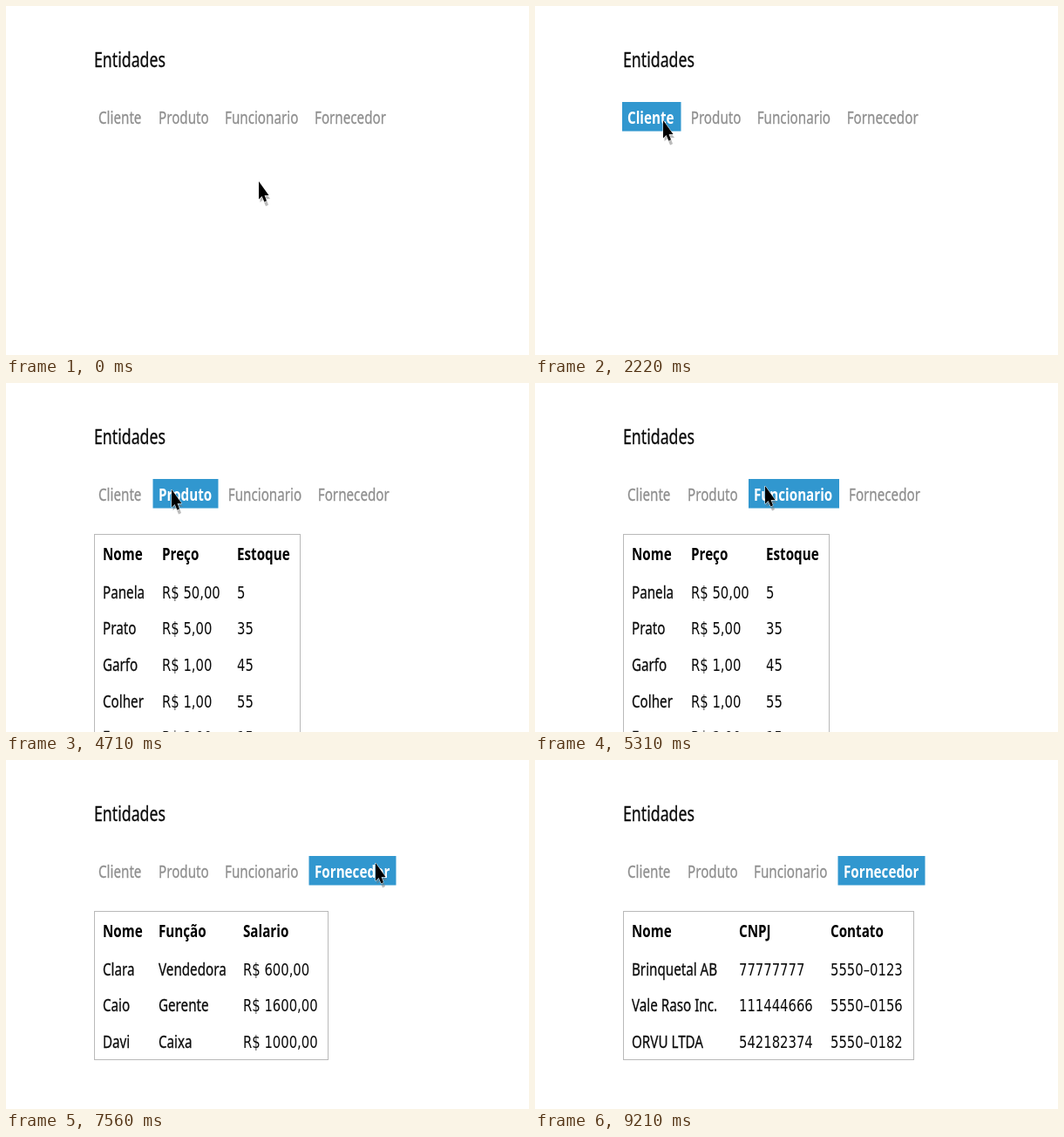
An HTML page that plays this animation: 600 by 400 pixels, repeating every 9270 ms.

```html
<!DOCTYPE html>
<html lang="pt">
<head>
<meta charset="utf-8">
<title>Entidades</title>
<style>
  html, body { margin: 0; width: 100%; height: 100%; overflow: hidden; background: #fff; }
  svg { display: block; }
  text { font: 20px "Noto Sans", sans-serif; fill: #0c0c0c; stroke: #0c0c0c; stroke-width: .3; white-space: pre; }
  .title { font-size: 23.3px; }
  .tab { fill: #8e8e8e; stroke: #8e8e8e; }
  .active { fill: #fff; stroke: none; font-weight: 700; }
  .head { fill: #000; stroke: none; font-weight: 700; }
  .number { font: 19.5px "DejaVu Sans", sans-serif; stroke: none; }
  .frame { fill: none; stroke: #b9b9b9; }
</style>
</head>
<body>
<svg width="600" height="400" viewBox="0 0 600 400">
  <g id="page"></g>
  <g id="cursor">
    <path d="M1.5 4V24L5 21L8 28.5L11 27L8.5 20H13Z" fill="#777" opacity=".5"/>
    <path d="M0 0V20.5L3.6 17L6.4 23.5L9 22.3L6.6 16H11.5Z" stroke="#fff" paint-order="stroke"/>
  </g>
</svg>
<script>
const LOOP = 9270;
const SQUEEZE = 0.76; // the whole screen is narrowed by this factor
const ROW_HEIGHT = 41.6;

const tabs = [
  { name: "Cliente", x: 106, left: 100, right: 167.5, shift: 3.7, on: 570 },
  { name: "Produto", x: 175, left: 168.5, right: 243.5, shift: 3.8, on: 2640 },
  { name: "Funcionario", x: 251, left: 245, right: 349, shift: 6, on: 5100 },
  { name: "Fornecedor", x: 354, left: 347.5, right: 447.5, shift: 0, on: 7260 }
];

const tables = [
  { on: 2310, right: 427.5, columns: [111, 227, 332], rows: [
    ["Nome", "CPF", "Contato"],
    ["Bruno Tavim", "111222333", "5550–0141"],
    ["Lia Morende", "444555666", "5550–0167"]] },
  { on: 4710, right: 337.5, columns: [111, 179, 265], rows: [
    ["Nome", "Preço", "Estoque"],
    ["Panela", "R$ 50,00", "5"],
    ["Prato", "R$ 5,00", "35"],
    ["Garfo", "R$ 1,00", "45"],
    ["Colher", "R$ 1,00", "55"],
    ["Faca", "R$ 2,00", "15"]] },
  { on: 6750, right: 369.5, columns: [111, 175, 272], rows: [
    ["Nome", "Função", "Salario"],
    ["Clara", "Vendedora", "R$ 600,00"],
    ["Caio", "Gerente", "R$ 1600,00"],
    ["Davi", "Caixa", "R$ 1000,00"]] },
  { on: 8610, right: 434.5, columns: [111, 234, 339], rows: [
    ["Nome", "CNPJ", "Contato"],
    ["Brinquetal AB", "77777777", "5550–0123"],
    ["Vale Raso Inc.", "111444666", "5550–0156"],
    ["ORVU LTDA", "542182374", "5550–0182"]] }
];

// Pointer stops: time, x, y
const stops = [
  [90, 290, 201], [390, 130, 118], [1710, 130, 118], [2220, 147, 131],
  [2310, 147, 131], [2610, 190, 122], [4740, 190, 122], [5070, 264, 118],
  [6810, 264, 118], [7170, 424, 118], [7590, 424, 118], [7800, 472, 127],
  [8640, 472, 127], [9030, 500, 140]
];
const POINTER_END = 9060;

const page = document.getElementById("page");
const cursor = document.getElementById("cursor");

const label = (x, y, kind, content) =>
  `<text class="${kind}" transform="translate(${x} ${y}) scale(${SQUEEZE} 1)">${content}</text>`;

function drawTabs(active) {
  const shift = active < 0 ? 0 : tabs[active].shift;
  return tabs.map((tab, i) => {
    if (i !== active) return label(tab.x + (i > active ? shift : 0), 135.2, "tab", tab.name);
    return `<rect x="${tab.left}" y="110" width="${tab.right - tab.left}" height="33.5" fill="#3197cf"/>`
      + label(tab.x, 135.2, "active", tab.name);
  }).join("");
}

function drawTable({ right, columns, rows }) {
  const height = Math.round(4 + rows.length * ROW_HEIGHT);
  const cells = rows.map((row, r) => row.map((cell, c) => {
    const kind = r === 0 ? "head" : /\d/.test(cell) ? "number" : "cell";
    const y = r === 0 ? 203.4 : 246.8 + (r - 1) * ROW_HEIGHT;
    return label(columns[c], y, kind, cell);
  }).join("")).join("");
  return `<rect class="frame" x="101.5" y="173.5" width="${right - 101.5}" height="${height}"/>` + cells;
}

function pointerAt(t) {
  const next = stops.findIndex(stop => stop[0] > t);
  if (next === 0) return stops[0].slice(1);
  if (next < 0) return stops[stops.length - 1].slice(1);
  const [t0, x0, y0] = stops[next - 1], [t1, x1, y1] = stops[next];
  const u = (t - t0) / (t1 - t0), eased = u * u * (3 - 2 * u);
  return [x0 + (x1 - x0) * eased, y0 + (y1 - y0) * eased];
}

const latest = (items, t) => items.filter(item => item.on <= t).length - 1;
let drawn = "";

function render(now) {
  const t = now % LOOP;
  const active = latest(tabs, t), table = latest(tables, t);
  const state = `${active},${table}`;
  if (state !== drawn) {
    page.innerHTML = label(101, 70, "title", "Entidades") + drawTabs(active)
      + (table < 0 ? "" : drawTable(tables[table]));
    drawn = state;
  }
  cursor.setAttribute("transform", `translate(${pointerAt(t)})`);
  cursor.setAttribute("visibility", t < POINTER_END ? "visible" : "hidden");
}

const start = performance.now();
function tick() {
  render(performance.now() - start);
  requestAnimationFrame(tick);
}
tick();
</script>
</body>
</html>
```
